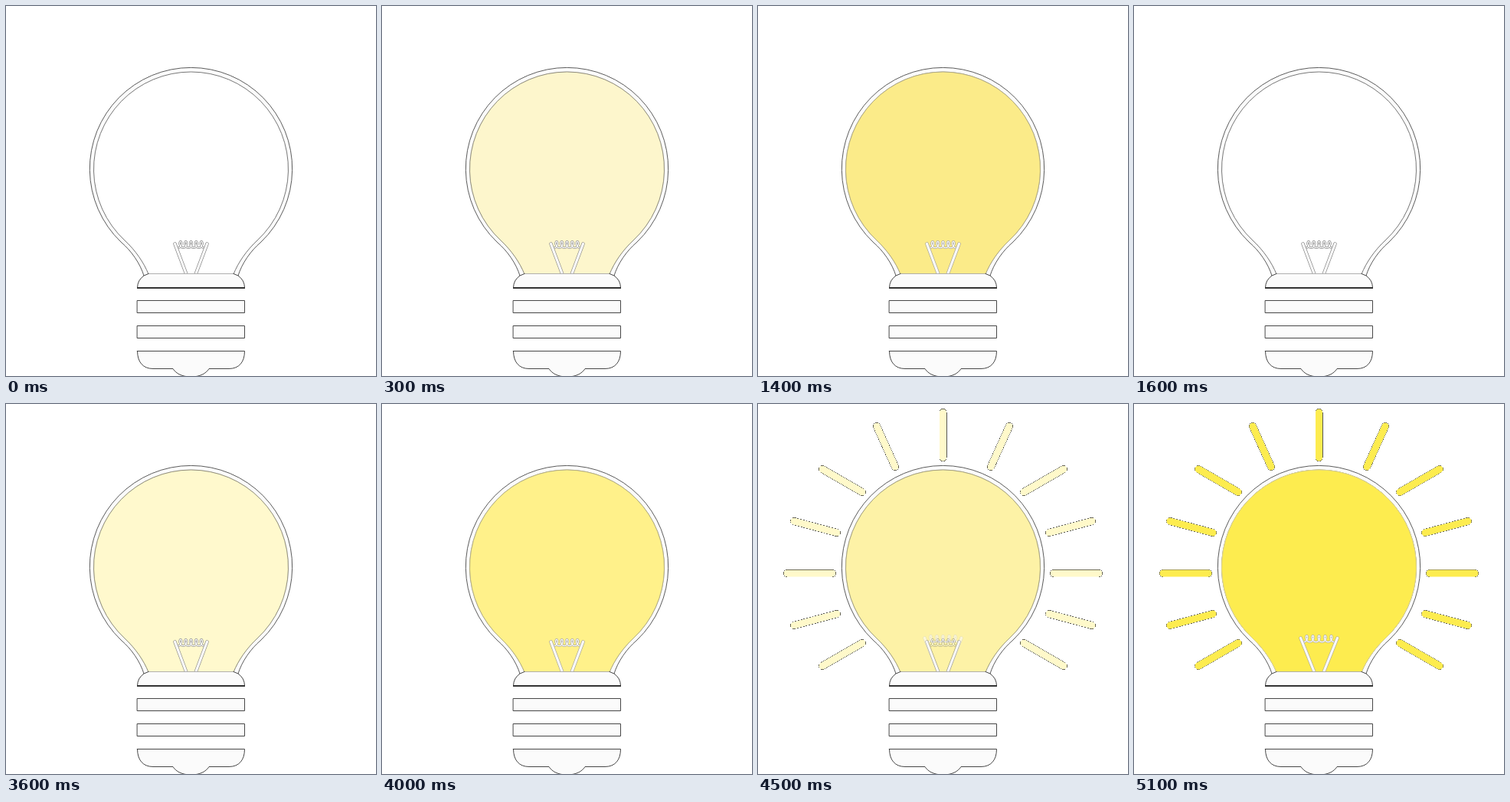
Recreate the animation shown at these times as an HTML page. Size 483 by 483 pixels, loop 8 s.

```html
<!DOCTYPE html>
<html lang="en">
<head>
<meta charset="utf-8">
<title>Light bulb</title>
<style>
  html, body { margin: 0; width: 100%; height: 100%; overflow: hidden; background: #fff; }
  svg { display: block; width: 100vw; height: 100vh; }
</style>
</head>
<body>
<svg viewBox="0 0 483 483" fill="none" stroke-linecap="round">
  <defs>
    <path id="inner" d="M186 350C180 335 169 319 155 306A127 127 0 1 1 328 306C314 319 303 335 297 350Z"/>
  </defs>
  <g stroke="#333" stroke-width=".8" fill="#fbfbfb">
    <path d="M180 352C175 336 164 320 150 308A132.2 132.2 0 1 1 333 308C319 320 308 336 303 352" shape-rendering="crispEdges"/>
    <use href="#inner" fill="#fff" stroke="#555"/>
  </g>
  <g id="dark"></g>
  <g id="flash"></g>
  <g id="glow"></g>
  <g id="outline" shape-rendering="crispEdges"></g>
  <g id="shine"></g>
  <g stroke="#333" stroke-width=".9" fill="#fbfbfb" shape-rendering="crispEdges">
    <path d="M171.5 368C171.5 360 176 352 186 349.5H297C307 352 311.5 360 311.5 368Z" stroke="none"/>
    <path d="M186 349.5H297" stroke="#aaa"/>
    <path d="M186 349.5L180 352Q171.5 358 171.5 368H311.5Q311.5 358 303 352L297 349.5"/>
    <path d="M171.5 368H311.5" stroke-width="1.3"/>
    <path d="M171.5 384.5H311.5V400.5H171.5ZM171.5 417.5H311.5V433.5H171.5Z"/>
    <path d="M171.5 450.5H311.5C311.5 465 304 473.5 291 473.5H265C261 480 253 484 241.5 484S222 480 218 473.5H192C179 473.5 171.5 465 171.5 450.5Z"/>
  </g>
</svg>
<script>
const el = id => document.getElementById(id);
const line = (d, color, width) => `<path d="${d}" stroke="${color}" stroke-width="${width}"/>`;

// Two stems joined by a coil of five loops.
function filament(halfWidth, top, edge) {
  const left = 241.5 - halfWidth, right = 241.5 + halfWidth;
  const stems = `M${left} ${top}L235 349M${right} ${top}L248 349`;
  const turns = 5, points = [];
  for (let i = 0; i <= 120; i++) {
    const u = i / 120, angle = u * turns * 2 * Math.PI;
    const x = left + 4 + u * (2 * halfWidth - 8) + 2.8 * Math.sin(angle);
    points.push(x.toFixed(1) + ' ' + (top + 1 + 4.2 * Math.cos(angle)).toFixed(1));
  }
  const coil = 'M' + points.join('L');
  return line(coil, edge, 2.5) + line(coil, '#fafafa', 1.3) +
    line(stems, edge, 4.4) + line(stems, '#fafafa', 3.2);
}

const bulb = (color, edge) => `<use href="#inner" fill="${color}" stroke="${edge}" stroke-width=".9"/>`;

el('dark').innerHTML = filament(21, 310.5, '#777');
el('flash').innerHTML = bulb('#ffec5a', '#d2c98a') + filament(21, 310.5, '#b4b0a4');
el('glow').innerHTML = bulb('#fae358', '#c9c08c') + filament(21, 310.5, '#b4b0a4');

const halfRays = 'M38 221H97M47 153L103 168M47 289L103 274M84 85L136 115M84 342L136 312M155 29L179 82';
const bothSides = part => part + `<g transform="matrix(-1 0 0 1 483 0)">${part}</g>`;
const rays = (color, width) => bothSides(line(halfRays, color, width)) + line('M241.5 11V70', color, width);
el('outline').innerHTML = rays('#555', 10) + rays('#fff', 9);
el('shine').innerHTML = rays('#fdec4f', 9) + bulb('#fdec4f', '#dcd38c') + filament(24, 305.5, '#aaa69a');

const begin = performance.now();

function draw() {
  const step = Math.floor((performance.now() - begin) % 8000 / 100);
  const ramp = (start, count) => Math.max(0, Math.min(1, (step - start + 1) / count)) ** 1.1;
  const rise = ramp(43, 9);
  el('flash').style.opacity = ramp(36, 3) - ramp(40, 3);
  el('glow').style.opacity = ramp(1, 9) - ramp(14, 3) + rise;
  el('shine').style.opacity = rise;
  el('outline').style.opacity = rise > 0 ? 1 : 0;
  requestAnimationFrame(draw);
}
draw();
</script>
</body>
</html>
```
